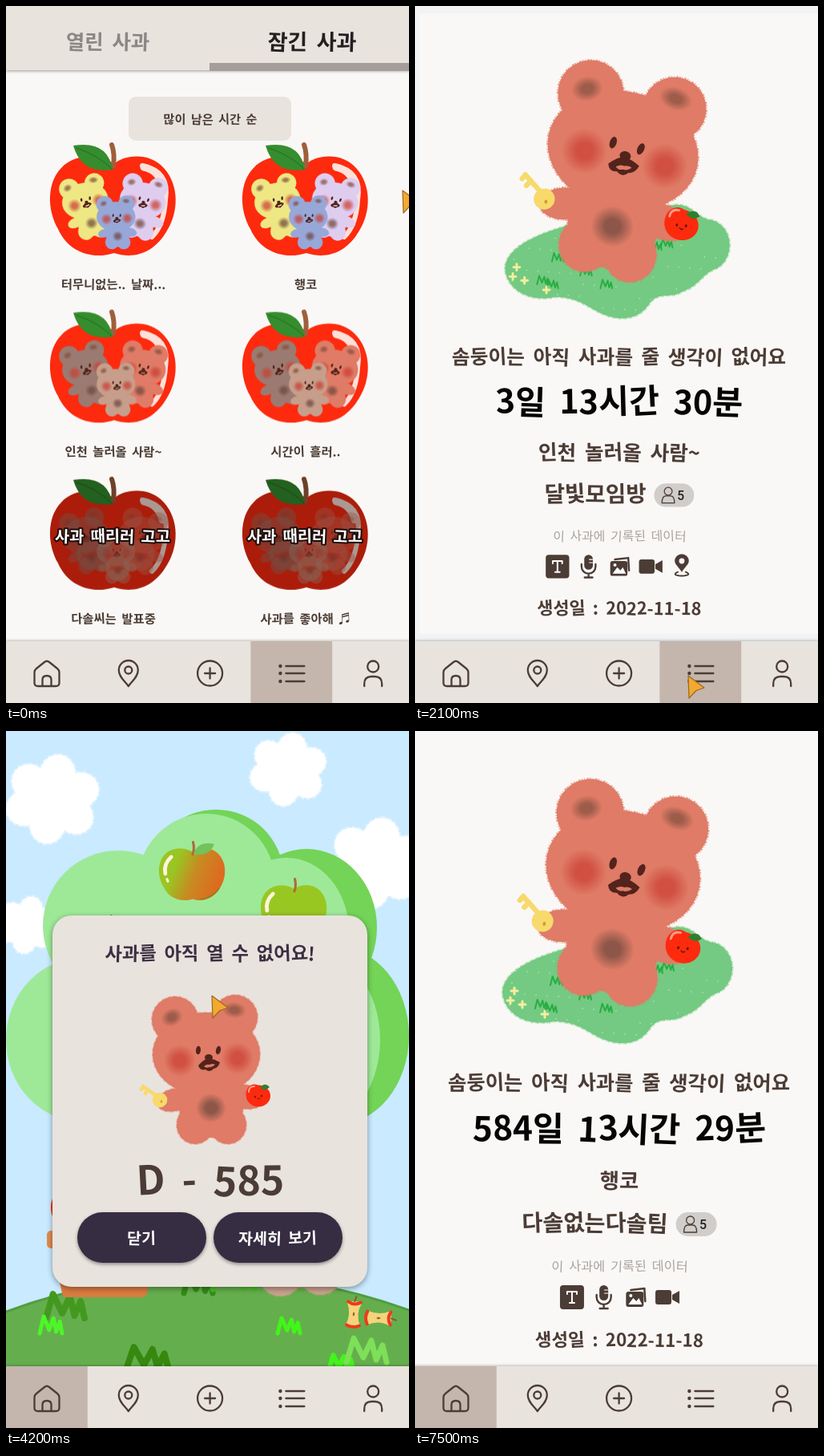
These frames come from a looping animation (503x869 px, 7600 ms). An HTML page with a canvas:

```html
<!DOCTYPE html>
<html lang="ko">
<head>
<meta charset="utf-8">
<title>사과나무</title>
<style>
html, body { margin: 0; width: 100%; height: 100%; overflow: hidden; background: #faf8f6; }
canvas { display: block; width: 100%; height: 100%; }
</style>
</head>
<body>
<canvas id="stage" width="503" height="869"></canvas>
<script>
const W = 503, H = 869, LOOP = 7600, STEP = 100;
const INK = '#4b3c35', PAPER = '#faf8f6', BEIGE = '#e9e3de', RED = '#fd2a0e', CORAL = '#df7b66';
const FONT = '"Noto Sans CJK KR", "Noto Sans CJK", "Noto Sans", "DejaVu Sans", sans-serif';
const stage = document.getElementById('stage').getContext('2d');
let g = stage;

// ---------- helpers ----------
function onLayer(w, h, draw) {
  const c = document.createElement('canvas');
  c.width = w; c.height = h;
  const prev = g;
  g = c.getContext('2d');
  draw();
  g = prev;
  return c;
}
function at(x, y, s, rot, draw) {
  g.save();
  g.translate(x, y); g.rotate(rot * Math.PI / 180); g.scale(s, s);
  draw();
  g.restore();
}
// Handwritten feel: wide word gaps, each letter slightly tilted
const SPACE = .42;
function letterWidths(s, size, weight = 700) {
  g.font = `${weight} ${size}px ${FONT}`;
  return [...s].map(c => c === ' ' ? size * SPACE : g.measureText(c).width);
}
const sum = list => list.reduce((a, b) => a + b, 0);
function text(s, x, y, size, color = INK, { left = false, weight = 700, outline } = {}) {
  const widths = letterWidths(s, size, weight);
  let pen = left ? x : x - sum(widths) / 2;
  g.textAlign = 'center'; g.textBaseline = 'middle';
  [...s].forEach((c, i) => {
    const sway = Math.sin(c.charCodeAt(0) * 7 + i * 2);
    at(pen + widths[i] / 2, y + sway * size * .025, 1, sway * 3, () => {
      if (outline) {
        g.strokeStyle = outline; g.lineWidth = 4; g.lineJoin = 'round';
        g.strokeText(c, 0, 0);
      }
      g.fillStyle = color;
      g.fillText(c, 0, 0);
    });
    pen += widths[i];
  });
}
function fray(path, color, width) {
  g.setLineDash([1.2, 1.1, .6, 1.6, 2, .7]);
  g.lineCap = 'butt';
  g.strokeStyle = color + 'a0'; g.lineWidth = width;
  g.stroke(path);
  g.setLineDash([]);
}
function oval(x, y, rx, ry, color, rot = 0, rough = 0) {
  const p = new Path2D();
  p.ellipse(x, y, rx, ry, rot, 0, 7);
  g.fillStyle = color; g.fill(p);
  if (rough) fray(p, color, rough);
}
function box(x, y, w, h, r, color) {
  g.beginPath(); g.roundRect(x, y, w, h, r);
  g.fillStyle = color; g.fill();
}
function shape(d, color) { g.fillStyle = color; g.fill(new Path2D(d)); }
function line(d, color, width) {
  g.strokeStyle = color; g.lineWidth = width;
  g.lineCap = g.lineJoin = 'round';
  g.stroke(new Path2D(d));
}
function spot(x, y, rx, ry, color, rot = 0) {
  g.save();
  g.translate(x, y); g.rotate(rot); g.scale(rx, ry);
  const soft = g.createRadialGradient(0, 0, .35, 0, 0, 1);
  soft.addColorStop(0, color + 'b8'); soft.addColorStop(1, color + '00');
  g.fillStyle = soft;
  g.fillRect(-1, -1, 2, 2);
  g.restore();
}
function shadowed(color, blur, dy, draw) {
  g.save();
  g.shadowColor = color; g.shadowBlur = blur; g.shadowOffsetY = dy;
  draw();
  g.restore();
}
function tuft(x, y, w, h, color, width = 6) {
  line(`M${x} ${y + h}L${x + w * .18} ${y}L${x + w * .42} ${y + h * .8}L${x + w * .62} ${y + h * .1}L${x + w * .74} ${y + h * .9}L${x + w * .9} ${y + h * .3}L${x + w} ${y + h}`, color, width);
}

// ---------- apples ----------
const APPLE = 'M80 27C92 15 125 12 142 32C162 54 160 88 146 110C130 138 105 146 80 138C52 147 22 136 10 108C-4 84-4 50 14 32C32 12 66 16 80 27Z';

function treeApple(x, y, fill, leaf, s = .51) {
  at(x, y, s, 0, () => {
    let paint = fill;
    if (fill === 'mix') {
      paint = g.createLinearGradient(15, 45, 145, 95);
      paint.addColorStop(.2, '#9ac522'); paint.addColorStop(.55, '#c78b22'); paint.addColorStop(1, '#df6920');
    }
    shape(APPLE, paint);
    line('M80 32Q85 18 81 3', '#b06a38', 6);
    if (leaf) shape('M82 32Q90 0 131 7Q122 37 82 32Z', leaf);
    line('M15 78Q10 55 29 38', '#fff3df', 9);
    line('M19 91L21 96', '#fff3df', 6);
    if (fill !== RED) line('M98 139Q128 134 143 113', '#6b8c1b', 2);
  });
}
function handApple() {
  oval(63, 35, 15, 13.5, RED);
  oval(58, 33, 10.5, 12.5, RED);
  line('M51 30Q51 23 58 23', '#ff9b86', 2);
  shape('M65 25Q71 17 77 24Q72 30 65 25Z', '#2f7f2c');
  oval(59, 36, 1, 1.3, '#5c1710'); oval(67, 35, 1, 1.3, '#5c1710');
  line('M62 38Q64 40 65 38', '#5c1710', 1);
}

// ---------- bear ----------
function key() {
  line('M-64 35L-81 23M-75 27L-78 32M-81 23L-83 27', '#f8d96c', 4.5);
  oval(-60, 40, 9.3, 9.3, '#f8d96c');
  oval(-58, 42, 1.3, 1.8, '#d59b2c');
}
function bear(x, y, s, rot, color, opt = {}) {
  at(x, y, s, rot, () => {
    const part = (px, py, rx, ry, r = 0) => oval(px, py, rx, ry, color, r, 2.2);
    if (opt.strap) {
      oval(-57, 2, 15, 29, '#41342f', -.5);
      oval(57, 0, 14, 28, '#41342f', .5);
    }
    part(-41, -60, 29, 29); part(34, -63, 28, 28);
    part(-2, -17, 67, 52);
    part(4, 42, 41, 45);
    part(-42, 40, 22, 14, -.25); part(46, 36, 24, 15, .2);
    part(-16, 71, 23, 24); part(25, 71, 23, 24);
    spot(-45, -63, 14, 11, '#84503f', -.4); spot(33, -72, 15, 10, '#84503f', .1);
    spot(-35, -9, 20, 20, '#cb3f34'); spot(37, -12, 20, 20, '#cb3f34');
    spot(4, 50, 19, 18, '#6d483e');
    oval(-12, -22, 3, 5.3, '#53231c', .1); oval(13, -22, 3, 5.3, '#53231c', .2);
    if (opt.chew) {
      line('M1-14L1-6M-8 11Q-10 0-8-1Q0 4 1-6Q6 4 15-1Q18 3 15 8', '#4b3129', 2);
      oval(1, -14, 4, 3, '#4b3129');
    } else {
      oval(1, -13, 5, 4, '#53231c');
      shape('M-12-3Q-5-11 1-12Q8-11 15-7Q13 0 7 1Q5 4 2 4Q-1 4-3 2Q-10 4-12-3Z', '#53231c');
      shape('M-5-2Q-1-5 2-4Q6-6 9-4Q5 0 2-1Q-2 1-5-2Z', color);
    }
    if (opt.items) { key(); handApple(); }
  });
}

// ---------- list screen ----------
function basketOfBears(left, right, front, dark) {
  return onLayer(174, 154, () => {
    g.translate(5, 5);
    shape(APPLE, RED);
    line('M115 29Q150 36 144 72Q142 104 127 118', '#fde0d8', 6);
    line('M117 31Q136 35 140 54', '#fde0d8', 9);
    if (dark) g.globalAlpha = .42;
    bear(46, 80, .43, -11, left);
    bear(115, 80, .43, 12, right);
    bear(83, 99, .36, 0, front);
    g.globalAlpha = 1;
    line('M77 3Q81 14 79 30', '#a05f3c', 6);
    shape('M29 4Q72-3 78 34Q39 40 29 4Z', '#358d2e');
    line('M33 7Q60 16 77 33', '#246b23', 1);
    if (dark) {
      g.globalCompositeOperation = 'source-atop';
      g.fillStyle = 'rgba(0,0,0,.32)';
      g.fillRect(-5, -5, 174, 154);
    }
  });
}
const pastel = basketOfBears('#eee784', '#dfcdf0', '#97a7d8');
const earthy = ['#9b7b71', CORAL, '#c69e8b'];
const rows = [pastel, basketOfBears(...earthy), basketOfBears(...earthy, true)];
const labels = ['터무니없는.. 날짜...', '행코', '인천 놀러올 사람~', '시간이 흘러..', '다솔씨는 발표중', '사과를 좋아해 ♬'];

function listScreen(pressed) {
  g.fillStyle = PAPER; g.fillRect(0, 0, W, H);
  shadowed('rgba(0,0,0,.4)', 4, 1, () => box(0, 0, W, 80, 0, BEIGE));
  box(254, 71, 249, 10, 0, '#a59d99');
  text('열린 사과', 127, 44, 25.5, '#8b8785');
  text('잠긴 사과', 382, 44, 27, '#232021');
  box(153, 113, 203, 55, 9, BEIGE);
  text('많이 남은 시간 순', 255, 141, 15.2);
  labels.forEach((label, i) => {
    const x = 55 + i % 2 * 240, row = i >> 1, y = 170 + row * 208.4;
    g.globalAlpha = pressed && i === 2 ? .25 : 1;
    g.drawImage(rows[row], x - 5, y - 5);
    text(label, x + 79, y + 177, 15.4);
    if (row === 2) text('사과 때리러 고고', x + 78, y + 74, 19.8, '#fff', { outline: '#1d0d0b' });
    g.globalAlpha = 1;
  });
}

// ---------- detail screen ----------
const dataIcons = [
  () => {
    box(-15, -15, 30, 30, 4, INK);
    line('M-6-4V-7H6V-4M0-7V7M-3 7H3', '#fff', 2);
  },
  () => {
    box(-5.5, -15, 11, 19, 5.5, INK);
    line('M-9-3V0A9 9 0 0 0 9 0V-3M0 9V14M-5 14H5', INK, 2.4);
    line('M1-9H5M1-5H5', '#fff', 1.2);
  },
  () => {
    line('M-6-9L11-11L12 5', INK, 2.5);
    box(-12, -7, 22, 19, 3, INK);
    shape('M-9 9L-3 1L1 5L4 1L8 9Z', '#fff');
    oval(-6, -2, 2, 2, '#fff');
  },
  () => {
    box(-15, -9, 20, 18, 3, INK);
    shape('M6-3L15-8V8L6 3Z', INK);
  },
  () => {
    shape('M0 7C-4 1-9-3-9-7A9 9 0 0 1 9-7C9-3 4 1 0 7Z', INK);
    oval(0, -7, 3.5, 3.5, PAPER);
    line('M-5 7Q-14 11 0 12Q14 11 5 7', INK, 2);
  }
];

function meadow() {
  const land = new Path2D('M109 326C110 300 145 284 185 272C230 248 300 252 322 245C348 240 352 262 374 264C400 272 404 310 381 325C360 332 358 348 336 355C321 365 306 354 294 370C283 387 266 393 243 387C218 380 209 363 174 362C136 370 111 350 109 326Z');
  g.fillStyle = '#74ca82'; g.fill(land);
  fray(land, '#74ca82', 3);
  g.save(); g.clip(land);
  for (let i = 1; i < 70; i++) {
    const x = 110 + i * 83 % 285, y = 285 + i * 47 % 100;
    oval(x, y, 1.2, .6, 'rgba(225,250,220,.55)', i);
  }
  g.restore();
  [[150, 335], [162, 340], [231, 340], [169, 306], [205, 324], [294, 291], [308, 288]].forEach(([x, y]) => tuft(x, y, 15, 11, '#28ad43', 2));
  [[124, 324], [119, 336], [134, 341], [162, 353]].forEach(([x, y]) => {
    line(`M${x - 4} ${y}H${x + 4}M${x} ${y - 4}V${y + 4}`, '#f5ee9d', 3);
  });
}
function teamRow(name) {
  const size = 28.3, w = sum(letterWidths(name, size)), left = 255 - (w + 61) / 2, pill = left + w + 10;
  text(name, left, 613, size, INK, { left: true });
  box(pill, 600, 51, 30, 15, '#d0cdca');
  at(pill + 18, 615, 1, 0, () => {
    g.beginPath(); g.arc(0, -5, 5, 0, 7);
    g.strokeStyle = INK; g.lineWidth = 1.3; g.stroke();
    line('M-8 10Q-8 1-3 1H3Q8 1 8 10Z', INK, 1.3);
  });
  g.font = '500 16px Roboto, sans-serif';
  g.textAlign = 'center'; g.fillStyle = '#222';
  g.fillText('5', pill + 34, 616);
}
function detailScreen(page) {
  box(0, 0, 530, 792, 0, PAPER);
  meadow();
  bear(257, 200, 1.45, 13, CORAL, { items: true });
  text('솜둥이는 아직 사과를 줄 생각이 없어요', 254.5, 438, 25.4);
  text(page.left, 255, 495, 42.3, '#050505');
  text(page.title, 255, 560, 26.3);
  teamRow(page.team);
  text('이 사과에 기록된 데이터', 255.5, 667, 16.3, '#aaa39f', { weight: 500 });
  for (let i = 0; i < page.icons; i++) {
    at(255.5 + (i - (page.icons - 1) / 2) * 39.7, 706, 1, 0, dataIcons[i]);
  }
  text('생성일 : 2022-11-18', 255, 759, 22.4);
}
const invite = { left: '3일 13시간 30분', title: '인천 놀러올 사람~', team: '달빛모임방', icons: 5 };
const team = { left: '584일 13시간 30분', title: '행코', team: '다솔없는다솔팀', icons: 4 };
const teamLater = { ...team, left: '584일 13시간 29분' };

// Page scaled about its centre while it opens or closes
function showPage(page, scale = 1, alpha = 1) {
  const pic = onLayer(W, H, () => {
    g.translate(251.5, 395); g.scale(scale, scale); g.translate(-251.5, -395);
    detailScreen(page);
  });
  g.globalAlpha = alpha;
  g.drawImage(pic, 0, 0);
  g.globalAlpha = 1;
}

// ---------- home screen ----------
function cloud(x, y, s) {
  oval(x, y, 36 * s, 34 * s, '#ffffff');
  for (let i = 0; i < 6; i++) {
    const a = i * Math.PI / 3 + .7;
    oval(x + Math.cos(a) * 36 * s, y + Math.sin(a) * 32 * s, 24 * s, 22 * s, '#ffffff', a, 4);
  }
}
function tree() {
  const dark = '#73d457', light = '#9ee998';
  [[262, 180, 84, 82], [375, 245, 88, 98], [410, 380, 93, 112]].forEach(c => oval(...c, dark));
  [[95, 385, 95, 102], [140, 243, 94, 94], [250, 190, 86, 87], [350, 250, 78, 92],
   [375, 385, 92, 115], [150, 478, 66, 72], [240, 370, 150, 140]].forEach(c => oval(...c, light));
  shape('M188 678Q216 615 213 558Q205 525 167 455C162 440 180 428 190 441L220 496Q231 507 239 492L256 412C262 394 284 396 282 414L275 675Z', '#b5866b');
  shape('M276 401Q285 404 282 416L277 474Q280 485 292 472L316 447C326 437 340 450 332 461L300 500Q286 520 290 570Q294 640 312 674L275 676Q253 610 253 540Q252 495 265 465Z', '#8b6043');
}
function basket() {
  treeApple(56, 562, RED, '#2f8f2d', .45);
  treeApple(117, 560, RED, '#2f8f2d', .43);
  treeApple(100, 596, RED, '#2f8f2d', .42);
  line('M84 576L70 629', '#c97545', 19);
  line('M161 578L175 629', '#c97545', 19);
  oval(70, 623, 5, 5, '#a8552d');
  oval(174, 623, 5, 5, '#a8552d');
  shape('M57 640H187L176 701Q175 706 170 706H76Q71 706 70 701Z', '#da7b40');
  box(51, 623, 142, 22, 5, '#e28b50');
  shape('M58 645H186L185 652H60Z', '#c8682f');
  shape('M85 623H162L130 668Q123 675 116 667Z', '#f6f5f4');
  shape('M85 623H96L126 672Q120 674 115 666Z', '#cbc9ca');
  line('M96 681V687M150 681V687M116 685Q123 693 131 685', '#4a2a2e', 4);
}
function core(x, y, rot) {
  at(x, y, 1, rot, () => {
    shape('M-9-14Q0-18 9-14Q2 0 9 14Q0 18-9 14Q-3 0-9-14Z', '#f5d47b');
    line('M-8-15Q0-10 8-15M-8 14Q0 18 8 14', '#ee3a1e', 4);
    line('M0-16L2-22', '#8b5a35', 2);
    oval(0, 0, 1.2, 2.5, '#9b6331');
  });
}
function homeScreen() {
  g.fillStyle = '#c9eaff'; g.fillRect(0, 0, W, H);
  cloud(58, 85, 1); cloud(352, 48, .82); cloud(462, 165, 1.02); cloud(27, 242, .64);
  tree();
  shape('M0 724Q250 632 503 722V800H0Z', '#65ae4d');
  line('M0 724Q250 632 503 722', '#519d40', 3);
  tuft(222, 676, 36, 25, '#338b17', 7);
  tuft(234, 667, 40, 18, '#48a92d', 6);
  tuft(258, 677, 52, 19, '#49bf26', 7);
  tuft(50, 702, 48, 30, '#43991f', 8);
  tuft(42, 730, 28, 21, '#4df628', 5);
  tuft(339, 732, 28, 19, '#42f51a', 5);
  tuft(150, 768, 53, 28, '#37880f', 8);
  tuft(403, 778, 30, 18, '#42f51a', 6);
  tuft(425, 757, 50, 30, '#7edf58', 7);
  treeApple(191, 137, 'mix', '#73c25b', .525);
  treeApple(318, 183, '#99c722', null, .525);
  treeApple(90, 229, RED, '#388d2c');
  treeApple(216, 292, '#99c722', null, .525);
  treeApple(65, 365, RED, '#388d2c');
  treeApple(343, 346, 'mix', null, .535);
  basket();
  core(434, 727, 4); core(465, 732, 92);
  bear(359, 588, 1.22, -2, '#c8a18d', { strap: true, chew: true });
  shape('M419 617Q426 609 434 615L441 616L437 622L442 629L436 634L435 640Q424 643 418 634Q413 625 419 617Z', RED);
  shape('M427 615Q430 608 437 611Q435 617 427 615Z', '#7bc95a');
}
function pillButton(x, label) {
  shadowed('rgba(0,0,0,.4)', 4, 2, () => box(x, 600, 161, 63, 31.5, '#362d42'));
  text(label, x + 80, 632, 19.5, '#fff');
}
function modal() {
  shadowed('rgba(0,0,0,.4)', 7, 2, () => box(58, 230, 393, 463, 24, BEIGE));
  text('사과를 아직 열 수 없어요!', 254.5, 277, 23.3, '#3b2f43');
  bear(252, 420, 1, 0, CORAL, { items: true });
  text('D - 585', 255, 560, 50);
  pillButton(89, '닫기');
  pillButton(259, '자세히 보기');
}

// ---------- navigation bar ----------
const navIcons = [
  'M-15.5-1Q-15.5-4-13-6L-3-14Q0-16.5 3-14L13-6Q15.5-4 15.5-1V12Q15.5 16 11 16H-11Q-15.5 16-15.5 12ZM-5.5 16V8Q-5.5 3 0 3Q5.5 3 5.5 8V16',
  'M0 16C-4 10-12 5-12-4A12 12 0 0 1 12-4C12 5 4 10 0 16ZM-4.5-4A4.5 4.5 0 1 0 4.5-4A4.5 4.5 0 1 0-4.5-4',
  'M-15.5 0A15.5 15.5 0 1 0 15.5 0A15.5 15.5 0 1 0-15.5 0M-6.5 0H6.5M0-6.5V6.5',
  'M-7-9H16M-7 0H16M-7 10H16M-14-9H-13.5M-14 0H-13.5M-14 10H-13.5',
  'M-7-8.5A7 7 0 1 0 7-8.5A7 7 0 1 0-7-8.5M-11 16V13Q-11 4-2 4H2Q11 4 11 13V16'
];
function navBar(active) {
  shadowed('rgba(0,0,0,.25)', 3, -1, () => box(0, 792, W, 77, 0, BEIGE));
  box(active * 101.8, 792, 101.8, 77, 0, '#c4b6ac');
  navIcons.forEach((d, i) => at(51 + i * 101.8, 832, 1, 0, () => {
    line(d, INK, 2.3);
    if (i === 3) [-9, 0, 10].forEach(y => oval(-14, y, 2.2, 2.2, INK));
  }));
}

// ---------- pointer ----------
const track = [
  [0, 495, 230], [500, 158, 475], [1100, 158, 475], [1800, 341, 835], [2100, 341, 835],
  [2700, 46, 825], [2900, 46, 825], [3400, 165, 612], [3800, 257, 330], [4200, 257, 330],
  [4800, 317, 606], [5200, 317, 606], [5500, 320, 615], [6700, 320, 615], [7300, -40, 700], [7600, -40, 700]
];
function pointer(t) {
  const i = track.findIndex(k => k[0] > t), [t0, x0, y0] = track[i - 1], [t1, x1, y1] = track[i];
  const p = (t - t0) / (t1 - t0), e = p * p * (3 - 2 * p);
  at(x0 + (x1 - x0) * e, y0 + (y1 - y0) * e, 1, 0, () => {
    const d = 'M0 0L20 15L10 18.5L1 28Z';
    shape(d, '#f3a92f');
    line(d, '#9a6826', 1.2);
  });
}

// ---------- timeline ----------
function render(t) {
  g.fillStyle = PAPER; g.fillRect(0, 0, W, H);
  if (t < 700) listScreen(t >= 500);
  else if (t < 900) {
    listScreen(true);
    showPage(invite, t < 800 ? .92 : .98, t < 800 ? .5 : .95);
  } else if (t < 2100) showPage(invite);
  else if (t < 2200) {
    box(0, 0, W, H, 0, '#f1f3f4');
    showPage(invite, .977);
  } else if (t < 2900) {
    listScreen(false);
    if (t < 2300) showPage(invite, .92, .45);
  } else if (t < 5500) {
    homeScreen();
    if (t >= 4100 && t < 5100) {
      const card = onLayer(W, H, modal);
      g.globalAlpha = t < 4200 ? .5 : 1;
      g.drawImage(card, 0, 0);
      g.globalAlpha = 1;
    }
    if (t >= 5300) showPage(team, t < 5400 ? .92 : .98, t < 5400 ? .45 : .9);
  } else showPage(t < 6500 ? team : teamLater);
  navBar(t < 2900 ? 3 : 0);
  pointer(t);
}

let shown = -1;
const start = performance.now();
function tick() {
  const t = Math.floor((performance.now() - start) % LOOP / STEP) * STEP;
  if (t !== shown) { render(t); shown = t; }
  requestAnimationFrame(tick);
}
tick();
</script>
</body>
</html>
```
